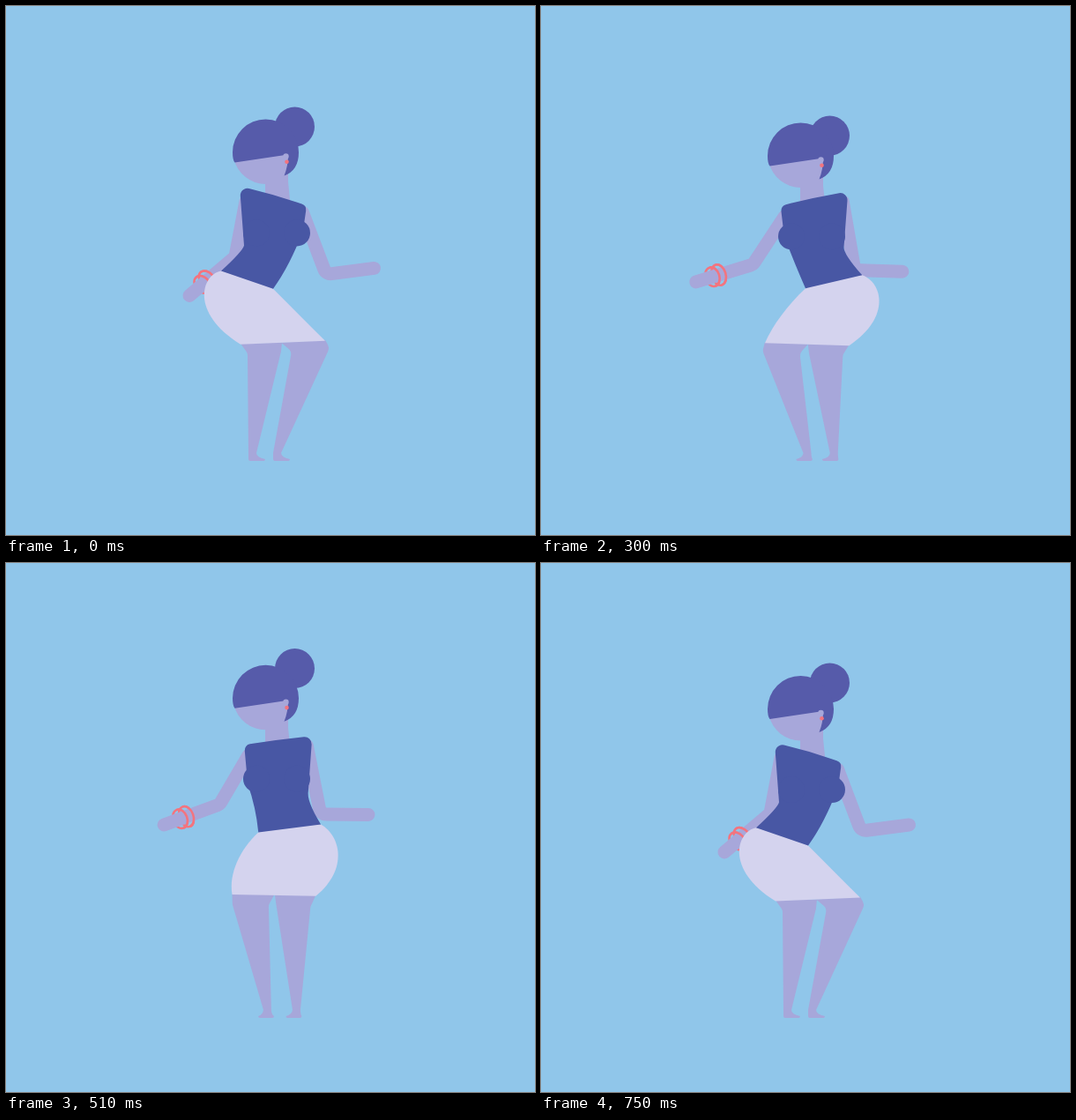
An HTML page with a canvas that plays this animation: 600x600 px, repeating every 780 ms.

```html
<!DOCTYPE html>
<html lang="en">
<head>
<meta charset="utf-8">
<title>Dancer</title>
<style>
  html, body { margin: 0; width: 100%; height: 100%; overflow: hidden; background: #90c6ea; }
  canvas { display: block; width: 600px; height: 600px; }
</style>
</head>
<body>
<canvas id="stage" width="600" height="600"></canvas>
<script>
const ctx = document.getElementById('stage').getContext('2d');
const SKY = '#90c6ea', SKIN = '#a7a7da', HAIR = '#565baa';
const TOP = '#4857a4', SKIRT = '#d4d3ee', CORAL = '#f3747f';
const LOOP = 780, STEP = 30, AXIS = 307, FLOOR = 516;

// Eased keys: [time, value]
const TURN = [[30, -1], [390, 1], [710, -1]];
const BOUNCE = [[-15, -0.8], [170, 16], [375, -1.2], [570, -16]];
const BUN = [[-20, 136], [140, 167], [375, 142], [540, 118]];

// Body outline. Turned sideways: back point, fore point.
// Facing front: half width and height, symmetric about the axis.
const BODY = {
  shoulder: [265, 205, 341, 227, 39, 213],
  rib: [270, 272, 337, 255, 35, 267],
  tuck: [269, 278, 322, 295, 30, 281],
  waist: [244, 301, 303, 321, 40, 309],
  hip: [222, 305, 323, 341, 62, 327],
  thigh: [208, 348, 343, 361, 69, 358],
  hem: [266, 384, 362, 380, 47, 383],
  kneeOut: [274, 394, 367, 388, 42.5, 396],
  kneeIn: [312, 392, 324, 392, 3, 394],
  crotch: [313, 382, 312, 382, 1, 382],
  ankleOut: [275, 507, 312, 507, 23, 507],
  ankleIn: [284, 507, 303, 507, 14, 507],
  toeOut: [275, 514, 322, 514, 25.5, 514],
  toeIn: [294, 514, 303, 514, 8.5, 514]
};

// Shoulder, elbow, hand: turned left, front, turned right
const ARM_L = [
  [272, 222, 260, 285, 208, 329],
  [273, 226, 245, 283, 184, 311],
  [277, 239, 239, 292, 173, 309]
];
const ARM_R = [
  [336.5, 235, 363, 305, 417.5, 298],
  [340, 223, 358, 301, 412.5, 300],
  [343, 217, 355, 294.5, 409, 297]
];

const mix = (a, b, u) => a + (b - a) * u;
const ease = u => u < 0.5 ? 2 * u * u : 1 - 2 * (1 - u) * (1 - u);

// Value of a looping track of eased keys.
function track(keys, t) {
  const [t0, v0] = keys[0];
  if (t < t0) t += LOOP;
  const all = [...keys, [t0 + LOOP, v0]];
  const k = all.findIndex(key => key[0] > t);
  const [ta, va] = all[k - 1], [tb, vb] = all[k];
  return mix(va, vb, ease((t - ta) / (tb - ta)));
}

// Outline for an amount of turn; the bounce fades out towards the floor.
function poseBody(amount, bounce) {
  const sink = y => y + bounce * Math.min(1, (FLOOR - y) / 306);
  const pose = {};
  for (const [name, [bx, by, fx, fy, half, y]] of Object.entries(BODY)) {
    pose[name] = [
      [mix(AXIS - half, bx, amount), sink(mix(y, by, amount))],
      [mix(AXIS + half, fx, amount), sink(mix(y, fy, amount))]
    ];
  }
  return pose;
}

function poseArm([left, front, right], turn, bounce) {
  const side = turn < 0 ? left : right;
  return front.map((v, i) => mix(v, side[i], Math.abs(turn)) + (i % 2 ? bounce : 0));
}

function fill(color, trace) {
  ctx.fillStyle = color;
  ctx.beginPath();
  trace();
  ctx.closePath();
  ctx.fill();
}

function disc(color, x, y, r) {
  fill(color, () => ctx.arc(x, y, r, 0, Math.PI * 2));
}

function drawArm([sx, sy, ex, ey, hx, hy]) {
  ctx.strokeStyle = SKIN;
  ctx.lineWidth = 15;
  ctx.lineCap = ctx.lineJoin = 'round';
  ctx.beginPath();
  ctx.moveTo(sx, sy);
  ctx.arcTo(ex, ey, hx, hy, 8);
  ctx.lineTo(hx, hy);
  ctx.stroke();
}

function drawBangles([, , ex, ey, hx, hy], from, to) {
  ctx.save();
  ctx.translate(hx, hy);
  ctx.rotate(Math.atan2(ey - hy, ex - hx));
  ctx.strokeStyle = CORAL;
  ctx.lineWidth = 2.6;
  ctx.lineCap = 'butt';
  for (const [x, ry] of [[19.5, 11], [27, 12]]) {
    ctx.beginPath();
    ctx.ellipse(x, 0, 8, ry, 0, from, to);
    ctx.stroke();
  }
  ctx.restore();
}

function drawHead(bounce, bunY) {
  disc(HAIR, 327.5, bunY, 22.5);
  ctx.save();
  ctx.translate(0, bounce);
  fill(SKIN, () => {
    ctx.moveTo(262, 172);
    ctx.lineTo(320, 166);
    ctx.lineTo(320, 200);
    ctx.lineTo(323, 230);
    ctx.lineTo(294, 230);
    ctx.lineTo(294, 202.5);
    ctx.arc(294.5, 165.5, 37, Math.PI / 2, 2.9);
  });
  fill(HAIR, () => {
    ctx.moveTo(259.5, 178);
    ctx.quadraticCurveTo(257, 175, 257, 166.5);
    ctx.arc(294.5, 166.5, 37.5, Math.PI, 0);
    ctx.quadraticCurveTo(332, 187, 315.5, 193);
    ctx.quadraticCurveTo(320, 182, 320, 169);
  });
  disc(SKIN, 317.5, 171, 3.2);
  disc(CORAL, 318.5, 177.3, 2.3);
  ctx.restore();
}

// A leg runs down its first edge, around the foot and up the second.
function drawLeg(hip, kneeA, ankleA, toeA, toeB, ankleB, kneeB, crotch) {
  const dir = Math.sign(toeB[0] - toeA[0]) * 2;
  fill(SKIN, () => {
    ctx.moveTo(hip[0], hip[1] - 1);
    ctx.arcTo(...kneeA, ...ankleA, 8);
    ctx.lineTo(...ankleA);
    ctx.quadraticCurveTo(ankleA[0], 512, ...toeA);
    ctx.quadraticCurveTo(toeA[0], FLOOR, toeA[0] + dir, FLOOR);
    ctx.lineTo(toeB[0] - dir, FLOOR);
    ctx.quadraticCurveTo(toeB[0], FLOOR, ...toeB);
    ctx.quadraticCurveTo(ankleB[0], 512, ...ankleB);
    ctx.arcTo(...kneeB, ...crotch, 8);
    ctx.lineTo(...crotch);
  });
}

function drawSkirt({ waist, hip, thigh, hem }) {
  fill(SKIRT, () => {
    ctx.moveTo(...waist[0]);
    ctx.lineTo((waist[0][0] + waist[1][0]) / 2, (waist[0][1] + waist[1][1]) / 2 - 6);
    ctx.lineTo(...waist[1]);
    ctx.bezierCurveTo(...hip[1], ...thigh[1], ...hem[1]);
    ctx.lineTo(...hem[0]);
    ctx.bezierCurveTo(...thigh[0], ...hip[0], ...waist[0]);
  });
}

function drawTorso({ shoulder: [a, b], rib, tuck, waist }, bustY, arch) {
  const neck = [(a[0] + b[0]) / 2, (a[1] + b[1]) / 2 - arch];
  fill(TOP, () => {
    ctx.moveTo(...rib[0]);
    ctx.arcTo(...a, ...neck, 8);
    ctx.quadraticCurveTo(...neck, mix(neck[0], b[0], 0.7), mix(neck[1], b[1], 0.7));
    ctx.arcTo(...b, ...rib[1], 7);
    ctx.lineTo(...rib[1]);
    ctx.quadraticCurveTo(...tuck[1], ...waist[1]);
    ctx.lineTo(...waist[0]);
    ctx.quadraticCurveTo(...tuck[0], ...rib[0]);
  });
  for (const x of [284, 330]) disc(TOP, x, bustY, 15);
}

function draw(t) {
  const turn = track(TURN, t), bounce = track(BOUNCE, t);
  const amount = Math.abs(turn);
  const armL = poseArm(ARM_L, turn, bounce), armR = poseArm(ARM_R, turn, bounce);
  const body = poseBody(amount, bounce);

  ctx.fillStyle = SKY;
  ctx.fillRect(0, 0, 600, 600);
  drawBangles(armL, 0, Math.PI * 2);
  drawArm(armL);
  drawBangles(armL, -Math.PI / 2, Math.PI / 2);
  drawArm(armR);
  drawHead(bounce, track(BUN, t));

  ctx.save();
  if (turn > 0) {
    ctx.translate(2 * AXIS, 0);
    ctx.scale(-1, 1);
  }
  for (const i of [0, 1]) {
    const parts = ['hem', 'kneeOut', 'ankleOut', 'toeOut', 'toeIn', 'ankleIn', 'kneeIn', 'crotch'];
    drawLeg(...parts.map(name => body[name][i]));
  }
  drawSkirt(body);
  drawTorso(body, 258 + bounce, 2 * amount);
  ctx.restore();
}

function tick(now) {
  draw(Math.floor((now % LOOP) / STEP) * STEP);
  requestAnimationFrame(tick);
}
tick(performance.now());
</script>
</body>
</html>
```
